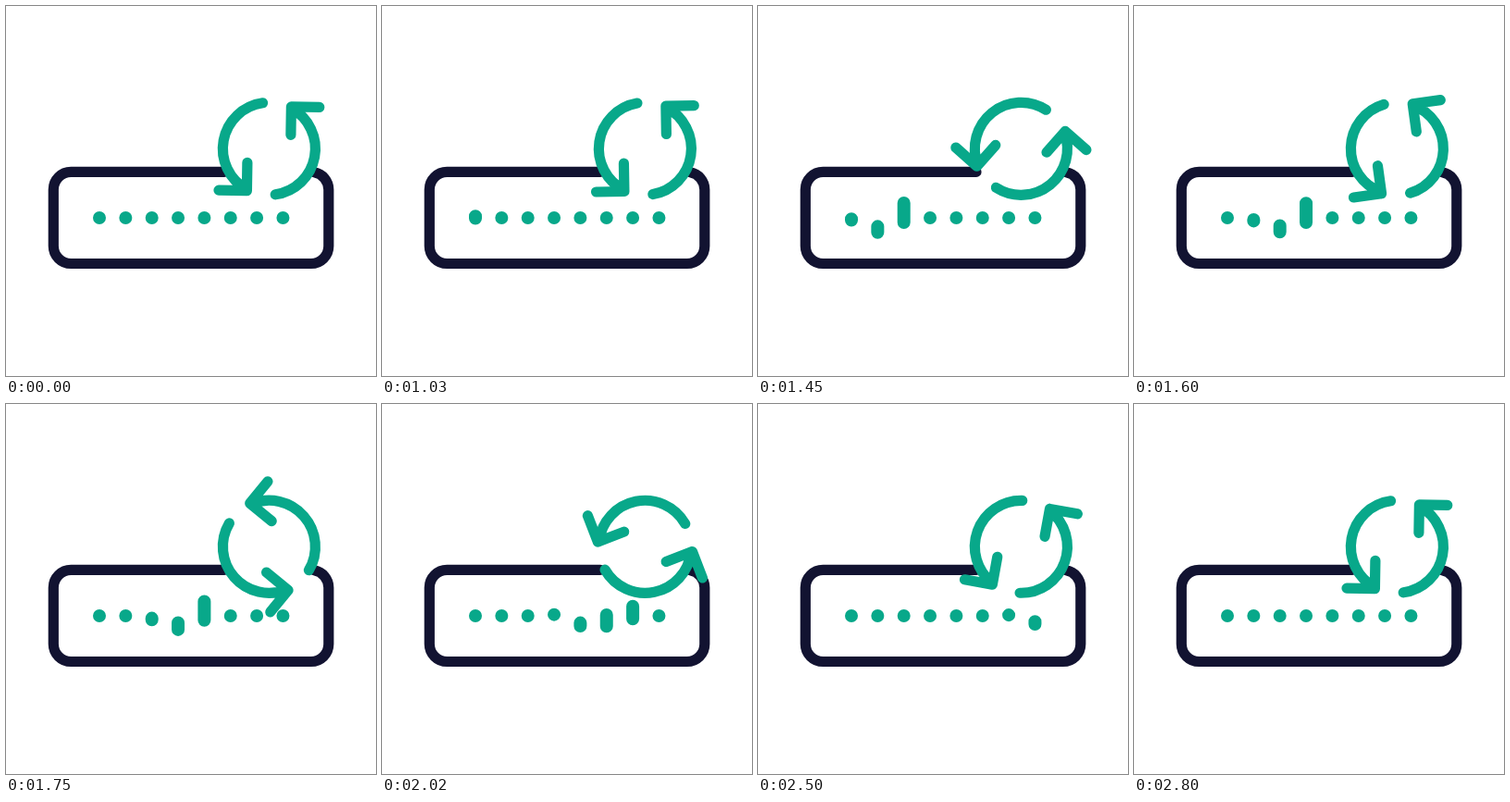
Recreate the animation shown at these times as an HTML page. Size 400 by 400 pixels, loop 2.83 s.

```html
<!DOCTYPE html>
<html lang="en">
<head>
<meta charset="utf-8">
<title>Password reset</title>
<style>
  html, body { margin: 0; height: 100%; overflow: hidden; background: #fff; }
  svg { display: block; width: 100%; height: 100%; }
  path { fill: none; stroke-linecap: round; stroke-linejoin: round; }
</style>
</head>
<body>
<svg viewBox="0 0 400 400">
  <path stroke="#121331" stroke-width="11.2" d="M236 179.4H70.3a19 19 0 0 0-19 19V259.5a19 19 0 0 0 19 19H329.8a19 19 0 0 0 19-19V198.4a19 19 0 0 0-15.5-18.6"/>
  <path id="dots" stroke="#08a88a" stroke-width="14"/>
  <g id="arrows" stroke="#08a88a" stroke-width="11.2">
    <path id="arrow" d="M-6.8-49.5A50 50 0 0 0-24 43.9V45.4M-54.4 44.9L-24 45.4L-23.5 15"/>
    <use href="#arrow" transform="rotate(180)"/>
  </g>
</svg>
<script>
const LOOP = 2830, START = 1000, STEP = 30, STEPS = 60, STAGGER = 5.2;
const dots = document.getElementById('dots');
const arrows = document.getElementById('arrows');

// Poses of a bouncing dot: stretch up, drop, overshoot, rest
const poses = [
  { at: 0, top: 0, bottom: 0 },
  { at: 4.7, top: -16, bottom: 5 },
  { at: 11, top: 12, bottom: 16.8 },
  { at: 17, top: -2.5, bottom: -2.5 },
  { at: 20, top: 0, bottom: 0 }
];

const smooth = u => u * u * (3 - 2 * u);
const mix = (a, b, u) => a + (b - a) * u;

function bounce(step) {
  const i = poses.findIndex(pose => pose.at > step);
  if (i < 1) return poses[0];
  const a = poses[i - 1], b = poses[i];
  const u = smooth((step - a.at) / (b.at - a.at));
  return { top: mix(a.top, b.top, u), bottom: mix(a.bottom, b.bottom, u) };
}

// cubic-bezier(.124, 0, .39, 1)
function ease(x) {
  let lo = 0, hi = 1;
  for (let i = 0; i < 24; i++) {
    const s = (lo + hi) / 2, r = 1 - s;
    if (3 * r * r * s * .124 + 3 * r * s * s * .39 + s ** 3 < x) lo = s;
    else hi = s;
  }
  return smooth(lo);
}

function draw(now) {
  const t = now % LOOP;
  const n = Math.min(STEPS, Math.max(0, Math.floor((t - START) / STEP)));
  arrows.setAttribute('transform', `translate(284.4 154.3) rotate(${-360 * ease(n / STEPS)})`);
  let d = '';
  for (let i = 0; i < 8; i++) {
    const { top, bottom } = bounce(n - i * STAGGER);
    d += `M${101 + i * 28.35} ${229 + top}V${229.01 + bottom}`;
  }
  dots.setAttribute('d', d);
}

const began = performance.now();
function tick() {
  draw(performance.now() - began);
  requestAnimationFrame(tick);
}
tick();
</script>
</body>
</html>
```
